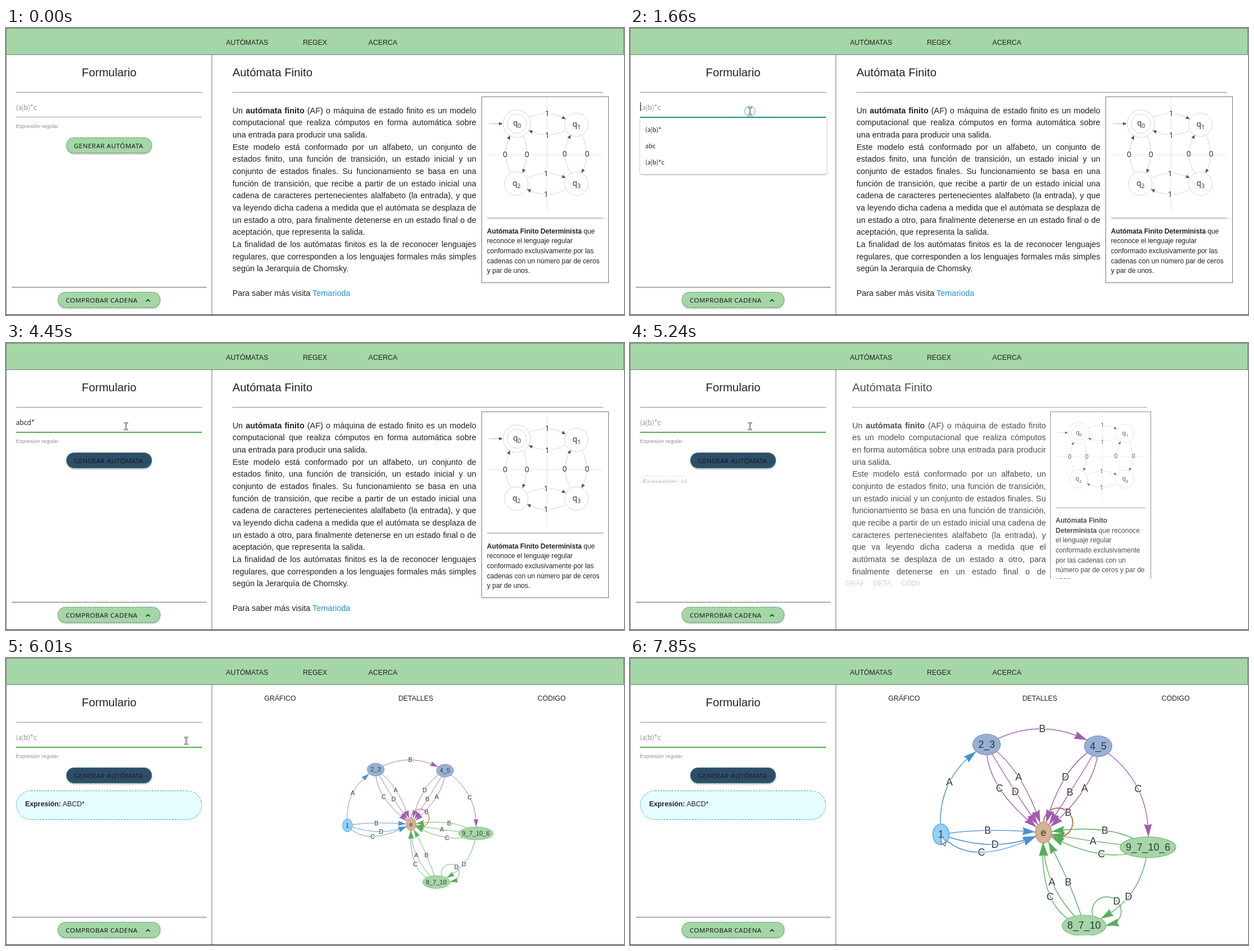
Write an HTML page that moves like this. It is 1097 by 511 pixels and loops after 8 s.

```html
<!DOCTYPE html>
<html lang="es">
<head>
<meta charset="utf-8">
<title>Autómata Finito</title>
<style>
html, body { margin: 0; width: 100%; height: 100%; overflow: hidden; background: #fff; }
* { box-sizing: border-box; }
#stage { position: relative; width: 1097px; height: 511px; overflow: hidden; color: #212121;
  font: 14.4px/21.69px "Liberation Sans", Arial, sans-serif; }
#stage > *, .a { position: absolute; }
header { left: 0; top: 0; width: 1097px; height: 48px; background: #a5d6a7; border: 1px solid #6f7f70; }
.t { line-height: 20px; white-space: nowrap; }
.mid { text-align: center; }
.nav { font-size: 12.33px; width: 120px; top: 15.5px; }
.h { font-size: 20.3px; }
.ui { font-family: "Noto Sans", sans-serif; font-size: 11.6px; }
.field { font-family: "Noto Sans CJK SC", "Noto Sans CJK JP", "Noto Sans", sans-serif; font-size: 12px; }
.line { height: 1px; background: #8a8a8a; }
.btn { display: block; height: 28px; border: 1px dashed #3f9a48; border-radius: 14px; background: #a5d6a7;
  line-height: 28px; letter-spacing: .42px; padding-left: 13px; white-space: nowrap; color: #1a1a1a;
  box-shadow: 0 2px 2px rgba(0,0,0,.16), 0 1px 4px rgba(0,0,0,.14); }
#menu { left: 17.5px; top: 160px; width: 331px; padding: 6px 0 7px 9.5px; background: #fff; border-radius: 0 0 3px 3px;
  box-shadow: 0 1px 3px rgba(0,0,0,.4); font-size: 11px; line-height: 29px; }
#leave, #enter { overflow: hidden; }
#leave { left: 365.4px; top: 48px; }
#leave p { margin: 0; }
.text { top: 88.5px; left: calc(var(--w) * .05); width: calc(var(--w) * .5915); text-align: justify; }
aside { top: 74px; left: calc(var(--w) * .654); width: calc(var(--w) * .309); border: 1px solid #757575;
  padding: 0 9px 11px; font-size: 12.05px; line-height: 17.6px; }
aside svg { display: block; width: 100%; }
aside .line { margin: 13px 0 14.4px; }
#enter { left: 366px; }
#tabs { left: 0; display: flex; }
#tabs div { flex: none; padding: 0 16px; overflow: hidden; font-size: 12.33px; }
#cardClip { left: 17.5px; top: 235.5px; overflow: hidden; }
#card { height: 52px; border: 1px dashed #3a9bd0; background: #e6feff; font-size: 12.33px; overflow: hidden; }
#over { left: 0; top: 0; }
</style>
</head>
<body>
<div id="stage">
  <header></header>
  <div class="t nav mid" style="left:368px">AUTÓMATAS</div>
  <div class="t nav mid" style="left:488.5px">REGEX</div>
  <div class="t nav mid" style="left:609px">ACERCA</div>

  <div style="left:0;top:48px;width:366px;height:463px;border:solid #777;border-width:0 1px 1px"></div>
  <div class="t h mid" style="left:18px;top:68.5px;width:330px">Formulario</div>
  <div class="line" style="left:17.5px;top:114px;width:330.5px"></div>
  <div id="value" class="t field" style="left:17.5px;top:130.5px"></div>
  <div id="caret" style="top:132px;width:1px;height:16px;background:#222"></div>
  <div id="rule" style="left:17.5px;top:158px;width:330.5px"></div>
  <div class="t" style="left:17.5px;top:165px;font-size:9.67px;color:#8e8e8e">Expresión regular</div>
  <div id="go" class="btn ui" style="left:106.5px;top:195px;width:152.5px">GENERAR AUTÓMATA</div>
  <div id="menu" class="field"></div>
  <div id="cardClip"><div id="card"><div id="cardText" class="a t"><b>Expresión:</b> ABCD*</div></div></div>
  <div class="line" style="left:10px;top:461px;width:346px;background:#666"></div>
  <div class="btn ui" style="left:92px;top:470px;width:182px">COMPROBAR CADENA</div>
  <svg style="left:246px;top:479px" width="12" height="12"><path d="M2.5 8L6 4.5L9.5 8" fill="none" stroke="#1a1a1a" stroke-width="1.5"/></svg>

  <div id="leave">
    <div class="a t h" style="left:calc(var(--w) * .05);top:20.5px">Autómata Finito</div>
    <div class="a line" style="left:calc(var(--w) * .05);top:66px;width:calc(var(--w) * .9)"></div>
    <div class="a text">
      <p>Un <b>autómata finito</b> (AF) o máquina de estado finito es un modelo computacional que realiza cómputos en forma automática sobre una entrada para producir una salida.</p>
      <p>Este modelo está conformado por un alfabeto, un conjunto de estados finito, una función de transición, un estado inicial y un conjunto de estados finales. Su funcionamiento se basa en una función de transición, que recibe a partir de un estado inicial una cadena de caracteres pertenecientes alalfabeto (la entrada), y que va leyendo dicha cadena a medida que el autómata se desplaza de un estado a otro, para finalmente detenerse en un estado final o de aceptación, que representa la salida.</p>
      <p>La finalidad de los autómatas finitos es la de reconocer lenguajes regulares, que corresponden a los lenguajes formales más simples según la Jerarquía de Chomsky.</p>
      <p><br>Para saber más visita <span style="color:#1d8fd8">Temarioda</span></p>
    </div>
    <aside class="a">
      <svg id="dfa" viewBox="854 122.5 206.6 203"></svg>
      <div class="line"></div>
      <b>Autómata Finito Determinista</b> que reconoce el lenguaje regular conformado exclusivamente por las cadenas con un número par de ceros y par de unos.
    </aside>
  </div>

  <div id="enter">
    <div id="tabs" class="a t mid"><div>GRÁFICO</div><div>DETALLES</div><div>CÓDIGO</div></div>
  </div>
  <div style="left:0;top:510px;width:1097px;height:1px;background:#333"></div>

  <svg id="over" width="1097" height="511">
    <clipPath id="view"><rect x="366" y="90" width="731" height="404"/></clipPath>
    <g clip-path="url(#view)"><g id="graph" font-family="Liberation Sans, Arial, sans-serif" font-size="17.8" text-anchor="middle" fill="#343434"></g></g>
    <circle id="ripple" cx="212.7" cy="148.5" fill="#fff" fill-opacity=".6" stroke="#86c5e2" stroke-width="1.5"/>
    <g id="beam" fill="none">
      <path d="M-3.5 -6H3.5M-3.5 6H3.5M0 -6V6" stroke="#555" stroke-width="2.6"/>
      <path d="M-2.8 -6H2.8M-2.8 6H2.8M0 -6V6" stroke="#fff" stroke-width=".9"/>
    </g>
    <path id="arrow" d="M.5 .5V14.8L3.7 11.9L6 18L8.5 17L6.1 11.2H10Z" fill="#fff" stroke="#555" stroke-width="1"/>
  </svg>
</div>
<script>
const $ = id => document.getElementById(id);
const clamp = x => Math.max(0, Math.min(1, x));
const smooth = x => x * x * (3 - 2 * x);
const LOOP = 8000;

// Diagram of the article
function drawDfa() {
  const ring = (x, y, r) => `<circle cx="${x}" cy="${y}" r="${r}" fill="#fff" stroke="#d2d2d2"/>`;
  const head = (x, y, dx, dy) => {
    const a = Math.atan2(dy, dx) * 180 / Math.PI;
    return `<path transform="translate(${x} ${y}) rotate(${a})" d="M0 0L-7 -3V3Z" fill="#555"/>`;
  };
  const arc = (x1, y1, cx, cy, x2, y2) =>
    `<path d="M${x1} ${y1}Q${cx} ${cy} ${x2} ${y2}" fill="none" stroke="#d2d2d2"/>` + head(x2, y2, x2 - cx, y2 - cy);
  const label = (s, x, y) => `<rect x="${x - 5}" y="${y - 7}" width="10" height="14" fill="#fff"/>` +
    `<text x="${x}" y="${y + 5}" text-anchor="middle">${s}</text>`;
  const state = (n, x, y) => `<text x="${x - 7}" y="${y + 4}">q<tspan font-size="10" dy="4">${n}</tspan></text>`;
  $('dfa').innerHTML = `<g font-family="Noto Sans, sans-serif" font-size="14" fill="#333">
    <path d="M855 225.5H1060" stroke="#ccc" stroke-dasharray="1 1"/><path d="M960.5 126V325" stroke="#cfe0ee"/>
    <path d="M857 170H880" stroke="#bbb"/>` + head(882, 170, 1, 0) +
    ring(907, 170, 24.5) + ring(907, 170, 17) + ring(1013, 172, 21) + ring(906, 277, 21) + ring(1013, 277, 21) +
    arc(928, 159, 962, 144, 994, 162) + arc(993, 182, 961, 198, 928, 182) +
    arc(919, 192, 931, 225, 917, 258) + arc(896, 258, 879, 225, 895, 191) +
    arc(1023, 191, 1040, 225, 1022, 258) + arc(1003, 258, 982, 225, 1003, 190) +
    arc(926, 267, 960, 250, 994, 267) + arc(993, 288, 960, 305, 925, 287) +
    label(1, 961, 152) + label(1, 961, 191) + label(1, 959, 259) + label(1, 959, 296) +
    label(0, 886, 225) + label(0, 925, 225) + label(0, 992, 224) + label(0, 1032, 224) +
    state(0, 907, 170) + state(1, 1013, 172) + state(2, 906, 277) + state(3, 1013, 277) + '</g>';
}

// Generated automaton, laid out at its largest zoom
const BLUE = '#4a8fd4', PURPLE = '#a25cb0', GREEN = '#55ae5b';
const nodes = {
  '1': [552, 314, 14.3, '#90d2fa', BLUE],
  'e': [734, 311, 14.3, '#d6b294', '#b98a68'],
  '2_3': [633, 154, 24.5, '#96b1d6', '#8f87c4'],
  '4_5': [831, 157, 24.5, '#96b1d6', '#8f87c4'],
  '9_7_10_6': [919.5, 337, 49.5, '#a5d6a7', '#74b878'],
  '8_7_10': [806, 476.5, 39, '#a5d6a7', '#74b878']
};
const RY = 18.5;
// from, to, colour, then label and the curve's midpoint
const edges = [
  ['1', '2_3', BLUE, 'A', 567, 221], ['1', 'e', BLUE, 'B', 635, 307], ['1', 'e', BLUE, 'D', 648, 332], ['1', 'e', BLUE, 'C', 624, 346],
  ['2_3', '4_5', PURPLE, 'B', 732, 126], ['2_3', 'e', PURPLE, 'A', 690, 212], ['2_3', 'e', PURPLE, 'D', 684, 238], ['2_3', 'e', PURPLE, 'C', 656, 232],
  ['4_5', '9_7_10_6', PURPLE, 'C', 902, 233], ['4_5', 'e', PURPLE, 'D', 773, 212], ['4_5', 'e', PURPLE, 'B', 781, 239], ['4_5', 'e', PURPLE, 'A', 807, 232],
  ['9_7_10_6', '8_7_10', GREEN, 'D', 885, 425], ['9_7_10_6', 'e', GREEN, 'B', 843, 307], ['9_7_10_6', 'e', GREEN, 'A', 822, 326], ['9_7_10_6', 'e', GREEN, 'C', 837, 349],
  ['8_7_10', 'e', GREEN, 'A', 749, 399], ['8_7_10', 'e', GREEN, 'B', 778, 399], ['8_7_10', 'e', GREEN, 'C', 746, 425]
];

function drawGraph() {
  const head = (x, y, angle, colour) =>
    `<path transform="translate(${x} ${y}) rotate(${angle * 180 / Math.PI})" d="M0 0L-23 -7L-20.5 0L-23 7Z" fill="${colour}"/>`;
  const label = (s, x, y) => `<text x="${x}" y="${y + 6.2}" stroke="#fff" stroke-width="2.5" paint-order="stroke">${s}</text>`;
  const loop = (s, x, y, colour, w) =>
    `<circle cx="${x}" cy="${y}" r="25.8" fill="none" stroke="${colour}" stroke-width="${w}"/>` + label(s, x + 18, y - 18);
  let out = loop('B', 760, 293, '#b06a3c', 1.8);
  for (const [from, to, colour, s, mx, my] of edges) {
    const [x1, y1] = nodes[from], [x2, y2, rx] = nodes[to];
    const cx = 2 * mx - (x1 + x2) / 2, cy = 2 * my - (y1 + y2) / 2;
    const at = t => [(1 - t) ** 2 * x1 + 2 * t * (1 - t) * cx + t * t * x2, (1 - t) ** 2 * y1 + 2 * t * (1 - t) * cy + t * t * y2];
    let t = 1;
    while (Math.hypot((at(t)[0] - x2) / rx, (at(t)[1] - y2) / RY) < 1) t -= .002;
    const [tx, ty] = at(t), [bx, by] = at(t - .1);
    out += `<path d="M${x1} ${y1}Q${cx} ${cy} ${x2} ${y2}" fill="none" stroke="${colour}" stroke-width="1.4"/>` +
      head(tx, ty, Math.atan2(ty - by, tx - bx), colour) + label(s, mx, my);
  }
  out += loop('D', 846, 451, GREEN, 1.4) + head(845, 475.5, Math.PI - .2, GREEN);
  for (const [name, [x, y, rx, fill, stroke]] of Object.entries(nodes))
    out += `<ellipse cx="${x}" cy="${y}" rx="${rx}" ry="${RY}" fill="${fill}" stroke="${stroke}" stroke-width="1.2"/>` +
      `<text x="${x}" y="${y + 5.8}">${name}</text>`;
  $('graph').innerHTML = out;
}

const typed = [[0, ''], [2250, 'a'], [2400, 'ab'], [2560, 'abc'], [2740, 'abcd'], [3710, 'abcd*'], [5130, '']];
const caretX = [18, 24, 31, 37, 45, 50];
const caretOn = [[1460, 1990], [2250, 3290], [3710, 4250]];
const zoomTimes = [6480, 6560, 6660, 6860, 7130];
const FOCUS = { x: 694.5, y: 271.8 };
const history = ['(a|b)*', 'abc', '(a|b)*c'];

const path = [[720, 458, 208], [850, 405, 192], [1000, 300, 164], [1130, 235, 151], [1260, 213, 148],
  [5840, 213, 148], [6010, 319, 147], [6200, 490, 178], [6360, 640, 247], [6470, 694, 271]];
function cursorAt(t) {
  if (t >= 7250) {
    const k = smooth(clamp((t - 7250) / 600));
    return [694 - 142 * k, 271 + 46 * k];
  }
  let i = 0;
  while (i < path.length - 2 && t > path[i + 1][0]) i++;
  const [t0, x0, y0] = path[i], [t1, x1, y1] = path[i + 1], k = clamp((t - t0) / (t1 - t0));
  return [x0 + (x1 - x0) * k, y0 + (y1 - y0) * k];
}

const show = (el, on) => { el.style.display = on ? '' : 'none'; };
const mix = (a, b, k) => `rgb(${a.map((v, i) => Math.round(v + (b[i] - v) * k))})`;

function drawForm(t) {
  const value = typed.filter(([at]) => t >= at).pop()[1];
  $('value').textContent = value || '(a|b)*c';
  $('value').style.color = value ? '#1c1c1c' : '#8e8e8e';
  $('caret').style.left = caretX[value.length] + 'px';
  show($('caret'), caretOn.some(([a, b]) => t >= a && t < b));

  const sent = clamp((t - 4250) / 200), focused = t >= 1460;
  $('rule').style.height = focused ? '2px' : '1px';
  $('rule').style.background = focused ? mix([38, 145, 140], [76, 175, 80], sent) : '#9e9e9e';
  $('go').style.background = mix([165, 214, 167], [45, 78, 106], sent);

  show($('menu'), t >= 1560 && t < 2560);
  $('menu').innerHTML = history.filter(s => s.startsWith(value)).map(s => `<div>${s}</div>`).join('');
}

const PANEL = 468;
function drawPanels(t) {
  const p = clamp((t - 5130) / 540), q = 1 - p;
  const leave = $('leave').style, enter = $('enter').style;
  show($('leave'), q > 0);
  leave.setProperty('--w', 731.6 * q + 'px');
  leave.width = 731.6 * q + 'px';
  leave.height = PANEL * q + 'px';
  leave.opacity = q;

  show($('enter'), p > 0);
  enter.top = 48 + PANEL * q + 'px';
  enter.width = 731 * p + 'px';
  enter.height = PANEL * p + 'px';
  enter.opacity = p;
  $('tabs').style.top = 20 * p - 6 + 'px';
  for (const tab of $('tabs').children) tab.style.width = 241 * p + 'px';

  const c = clamp((t - 5105) / 540);
  show($('cardClip'), t >= 5130);
  $('cardClip').style.height = 52.5 * c + 'px';
  $('cardClip').style.opacity = c;
  $('card').style.width = 330.5 * c + 'px';
  $('card').style.borderRadius = 6 + 20 * c + 'px';
  $('cardText').style.left = 1 + 15.5 * c + 'px';
  $('cardText').style.top = 15.5 * c - 1 + 'px';

  const zoom = 1.1 ** (zoomTimes.filter(at => t >= at).length - 5);
  show($('graph'), p === 1);
  $('graph').setAttribute('transform',
    `translate(${FOCUS.x} ${FOCUS.y}) scale(${zoom}) translate(${-FOCUS.x} ${-FOCUS.y})`);
}

function drawCursor(t) {
  const [x, y] = cursorAt(t);
  const inField = x < 348 && y < 160, overText = t < 1300 && x > 402;
  const beam = inField || overText;
  show($('beam'), t >= 720 && beam);
  show($('arrow'), t >= 720 && !beam);
  $('beam').setAttribute('transform', `translate(${x} ${y + .3})`);
  $('arrow').setAttribute('transform', `translate(${x} ${y})`);
  show($('ripple'), t >= 1460 && t < 1790);
  $('ripple').setAttribute('r', 4 + 5.3 * clamp((t - 1460) / 180));
}

function draw(t) {
  drawForm(t);
  drawPanels(t);
  drawCursor(t);
}

drawDfa();
drawGraph();
const start = performance.now();
function tick() {
  draw((performance.now() - start) % LOOP);
  requestAnimationFrame(tick);
}
tick();
</script>
</body>
</html>
```
